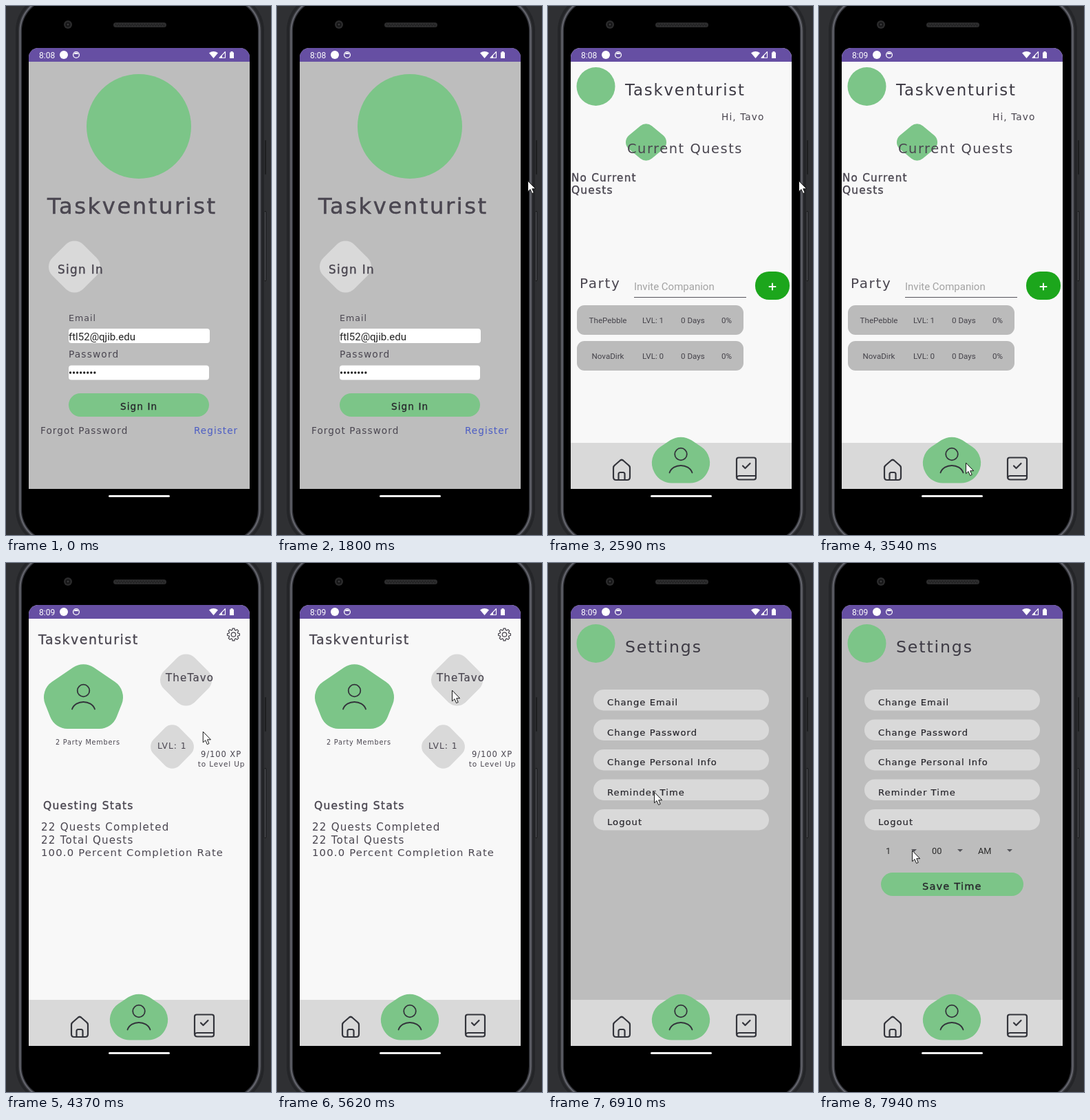
An HTML page with a canvas for the animation above (8000 ms loop, 385 px wide and 769 px high).

```html
<!DOCTYPE html>
<html lang="en">
<head>
<meta charset="utf-8">
<title>Quest app walkthrough</title>
<style>
html, body { margin: 0; width: 100%; height: 100%; overflow: hidden; background: #2f3033; }
canvas { display: block; width: 385px; height: 769px; }
</style>
</head>
<body>
<canvas id="stage" width="385" height="769"></canvas>
<script>
const LOOP = 8000, W = 385, H = 769;
const GREEN = '#7cc588', PALE = '#d9d9d9', GRAY = '#bdbdbd', LIGHT = '#f8f8f8';
const INK = '#4a4650', DARK = '#26252b', ICON = '#33343b';
const WIDE = '"DejaVu Sans", sans-serif', BODY = 'Roboto, sans-serif';
const TRACKING = 0.08;
const APP = 'Taskventurist';

const stage = document.getElementById('stage').getContext('2d');
let c = stage;

const clamp = v => Math.max(0, Math.min(1, v));
const span = (t, a, b) => clamp((t - a) / (b - a));
const smooth = u => u * u * (3 - 2 * u);

function box(x, y, w, h, r, fill) {
  c.beginPath();
  c.roundRect(x, y, w, h, r);
  c.fillStyle = fill;
  c.fill();
}

function disc(x, y, r, fill) {
  c.beginPath();
  c.arc(x, y, r, 0, 7);
  c.fillStyle = fill;
  c.fill();
}

function line(d, width, color) {
  c.lineWidth = width;
  c.strokeStyle = color;
  c.lineCap = c.lineJoin = 'round';
  c.stroke(new Path2D(d));
}

function shape(d, fill) {
  c.fillStyle = fill;
  c.fill(new Path2D(d));
}

// Polygon with rounded corners
function blob(pts, r, fill) {
  const n = pts.length, [ax, ay] = pts[0], [bx, by] = pts[n - 1];
  c.beginPath();
  c.moveTo((ax + bx) / 2, (ay + by) / 2);
  pts.forEach(([x, y], i) => c.arcTo(x, y, ...pts[(i + 1) % n], r));
  c.closePath();
  c.fillStyle = fill;
  c.fill();
}

const diamond = (x, y, a, b, r, fill) =>
  blob([[x, y - b], [x + a, y], [x, y + b], [x - a, y]], r, fill);

function text(str, x, y, size, { color = INK, font = WIDE, align = 'left', bold = 0 } = {}) {
  c.font = `${size}px ${font}`;
  c.letterSpacing = (font === WIDE ? size * TRACKING : 0) + 'px';
  c.textAlign = align;
  c.fillStyle = color;
  c.fillText(str, x, y);
  if (bold) {
    c.lineWidth = bold;
    c.strokeStyle = color;
    c.strokeText(str, x, y);
  }
}

function person(dx, dy) {
  c.save();
  c.translate(dx, dy);
  c.beginPath();
  c.arc(193, 651.5, 8.8, 0, 7);
  c.lineWidth = 1.8;
  c.strokeStyle = ICON;
  c.stroke();
  line('M176.5 678.5C181 664.5 205 664.5 209.5 678.5', 1.8, ICON);
  c.restore();
}

function navBar() {
  c.fillStyle = PALE;
  c.fillRect(-60, 635, 520, 67);
  blob([[193, 621], [244, 655], [223, 693.5], [163, 693.5], [142, 655]], 28, GREEN);
  person(0, 0);
  line('M95 671.5Q95 669 97 667.5L105 660.5Q107 659 109 660.5L117 667.5Q119 669 119 671.5V685Q119 689 115 689H99Q95 689 95 685Z' +
    'M102.5 689V680.5Q102.5 678 105 678H109Q111.5 678 111.5 680.5V689', 2.2, ICON);
  line('M277 656.5H299Q302 656.5 302 659.5V685.5Q302 688.5 299 688.5H278Q274 688.5 274 684.5V659.5Q274 656.5 277 656.5Z' +
    'M274.5 685Q275 683 278 683H302M283 668.5L286.5 672L293.5 665', 2.2, ICON);
}

function page(bg) {
  c.fillStyle = bg;
  c.fillRect(-60, 61, 520, 641);
}

function header(title, size) {
  disc(69.5, 117, 28, GREEN);
  text(title, 112, 130, size, { color: '#3d3a44' });
}

function login(t) {
  page(GRAY);
  disc(193, 175, 76, GREEN);
  text(APP, 60, 302, 32.2, { bold: 0.5 });
  diamond(99.5, 379, 45, 45, 18, PALE);
  text('Sign In', 75, 388.5, 16.8, { bold: 0.4 });
  text('Email', 91, 457.5, 12.6);
  box(91, 469, 205, 21, 4, '#fff');
  text('ftl52@qjib.edu', 91, 485.5, 15, { font: BODY, color: '#222' });
  text('Password', 91, 511, 13.8);
  box(91, 522.5, 204, 21, 4, '#fff');
  for (let i = 0; i < 8; i++) disc(93.5 + i * 5.05, 533, 1.7, '#222');
  const phase = t % 1000;
  if (phase >= 300 && phase < 800) {
    c.fillStyle = '#333';
    c.fillRect(131, 523, 1, 19);
  }
  box(91, 563, 204, 34, 17, GREEN);
  const press = span(t, 960, 1500);
  if (press > 0 && press < 1) {
    c.save();
    c.clip();
    disc(212, 586, 25 + 140 * Math.min(1, press * 2), `rgba(0,0,0,${0.1 * (1 - press)})`);
    c.restore();
  }
  text('Sign In', 166, 587, 13.6, { color: DARK, bold: 0.3 });
  text('Forgot Password', 50, 622, 13.6);
  text('Register', 273, 622, 13.5, { color: '#4b5cc4' });
}

function member(y, name, level) {
  const style = { font: BODY, color: '#45434a' };
  box(42, y, 242, 43, 11, '#bbb');
  text(name, 87, y + 25.5, 11.6, { ...style, align: 'center' });
  text('LVL: ' + level, 137, y + 26, 11.6, style);
  text('0 Days', 193, y + 25.5, 11.6, style);
  text('0%', 252, y + 26, 11.6, style);
}

function home() {
  page(LIGHT);
  header(APP, 22.8);
  text('Hi, Tavo', 252, 166, 13.7);
  diamond(142.5, 198, 37, 30.5, 13, GREEN);
  text('Current Quests', 115, 213.5, 19.4);
  text('No Current', 34, 254.5, 15.2, { bold: 0.4 });
  text('Quests', 34, 273, 15.4, { bold: 0.4 });
  text('Party', 46, 410, 20);
  text('Invite Companion', 125, 413, 15, { font: BODY, color: '#a3a3a3' });
  c.fillStyle = '#55535a';
  c.fillRect(125, 423, 163, 1);
  box(301, 386, 50, 41, 20, '#1ca61c');
  line('M321.5 408H330.5M326 403.5V412.5', 2, '#fff');
  member(435, 'ThePebble', 1);
  member(487, 'NovaDirk', 0);
  navBar();
}

function gear(x, y) {
  c.beginPath();
  for (let i = 0; i < 8; i++) {
    const a = i * Math.PI / 4;
    [[-0.27, 6.8], [-0.17, 9], [0.17, 9], [0.27, 6.8]].forEach(([d, r]) =>
      c.lineTo(x + r * Math.cos(a + d), y + r * Math.sin(a + d)));
  }
  c.closePath();
  c.moveTo(x + 3.2, y);
  c.arc(x, y, 3.2, 0, 7);
  c.lineWidth = 1.2;
  c.strokeStyle = '#44424a';
  c.lineJoin = 'round';
  c.stroke();
}

function profile() {
  page(LIGHT);
  text(APP, 47, 118, 19, { bold: 0.3 });
  gear(330.5, 104);
  blob([[112.5, 141.5], [176, 185], [154, 241], [71, 241], [49, 185]], 27, GREEN);
  person(-80.5, -466);
  text('2 Party Members', 72, 264, 9.7);
  diamond(261.5, 170, 45, 45, 18, PALE);
  text('TheTavo', 232, 172, 15, { bold: 0.2 });
  diamond(241.5, 267, 37.5, 38, 15, PALE);
  text('LVL: 1', 220, 270, 12.3);
  text('9/100 XP', 312.5, 282, 11.5, { align: 'center' });
  text('to Level Up', 313, 296, 10.5, { align: 'center' });
  text('Questing Stats', 54, 358, 15.5, { bold: 0.4 });
  text('22 Quests Completed', 51, 388.5, 15.1);
  text('22 Total Quests', 51, 407.5, 15.1);
  text('100.0 Percent Completion Rate', 51, 426, 14.8);
  navBar();
}

function settings(t) {
  page(GRAY);
  header('Settings', 23.6);
  ['Email', 'Password', 'Personal Info'].map(s => 'Change ' + s)
    .concat('Reminder Time', 'Logout')
    .forEach((label, i) => {
      const y = 184 + i * 43.5;
      box(66, y, 255, 30.5, 15, PALE);
      text(label, 86, y + 23, 13.1, { color: DARK, bold: 0.2 });
    });
  if (t >= 7130) {
    [['1', 97, 138], ['00', 164, 205], ['AM', 231, 277]].forEach(([label, x, mark]) => {
      text(label, x, 423, 12.8, { font: BODY, color: '#2b2b2b' });
      shape(`M${mark - 4} 416h8l-4 4z`, '#55555a');
    });
    box(90, 450, 207, 34, 17, GREEN);
    text('Save Time', 150, 474.5, 14.6, { color: DARK, bold: 0.3 });
  }
  navBar();
}

function statusBar(t) {
  c.fillStyle = '#664fa3';
  c.fillRect(33, 61, 321, 20);
  text(t < 3000 ? '8:08' : '8:09', 48, 75.5, 12, { font: BODY, color: '#fff' });
  disc(84, 71, 6, '#fff');
  c.beginPath();
  c.arc(102, 71, 4.4, 0, 7);
  c.lineWidth = 1.3;
  c.strokeStyle = '#fff';
  c.stroke();
  shape('M98.5 70a3.8 3.8 0 0 1 7 0z', '#fff');
  shape('M295 68.3Q301.5 63.5 308 68.3L301.5 76Z', '#fff');
  line('M310 75.3H318.5V66.5Z', 1.1, '#fff');
  shape('M310 75.5H314V71.5Z', '#fff');
  shape('M325 67.5H326.5V66H329.5V67.5H331V76H325Z', '#fff');
}

// One nested outline of the phone body, inset from the outermost edge
const shell = (inset, fill) =>
  box(14 + inset, -18 + inset, 361 - 2 * inset, 804 - 2 * inset, 54 - inset, fill);

function phone() {
  c.fillStyle = '#2f3033';
  c.fillRect(0, 0, W, H);
  shell(0, '#242528');
  box(376, 195, 2, 50, 1, '#1d1e20');
  box(375.5, 298, 2.5, 102, 1, '#18191b');
  box(376, 299, 1, 100, 0.5, '#5c5d62');
  shell(4, '#3a3b3f');
  shell(5.5, '#65666e');
  shell(7.5, '#33343a');
  shell(9, '#000');
  disc(90, 27, 6, '#2b2b2c');
  disc(90, 27, 3.6, '#161617');
  disc(90, 27, 1.4, '#3a3a3c');
  box(156, 24, 77, 7, 3.5, '#2c2c2d');
  for (let i = 0; i < 36; i++) {
    c.fillStyle = '#1b1b1c';
    c.fillRect(159 + i * 2, 25.5 + (i % 2) * 2, 1, 2);
  }
  box(149, 711, 89, 3, 1.5, '#f4f4f4');
}

// time, x, y of the pointer tip
const PATH = [
  [70, 330, 698], [850, 215, 588], [1150, 212, 586], [1660, 364, 254], [2620, 364, 254],
  [3150, 214, 673], [3340, 213, 664], [3620, 213, 664], [4190, 281, 266], [4970, 316, 113],
  [5130, 327, 103], [5330, 327, 103], [5620, 254, 185], [5830, 206, 237], [6200, 142, 325],
  [6440, 154, 333], [7250, 154, 333], [7660, 124, 402], [7800, 141, 421], [7920, 135, 418]
];

function pointer(t) {
  if (t < PATH[0][0]) return;
  let i = PATH.length - 1;
  while (PATH[i][0] > t) i--;
  const a = PATH[i], b = PATH[i + 1] || a;
  const u = a === b ? 0 : smooth(span(t, a[0], b[0]));
  c.save();
  c.translate(a[1] + (b[1] - a[1]) * u, a[2] + (b[2] - a[2]) * u);
  const arrow = 'M0.5 0.5V15.8L4 12.6L6.6 18.6L9.2 17.4L6.7 11.7H11.3Z';
  shape(arrow, '#fff');
  line(arrow, 1, '#1a1a1a');
  c.restore();
}

const layer = document.createElement('canvas');
layer.width = W;
layer.height = H;

function drawLayer() {
  c = layer.getContext('2d');
  home();
  c = stage;
}

// The new page slides and fades in while the old one drifts left
function enterHome(t) {
  const p = 1 - Math.pow(1 - span(t, 2090, 2520), 2.2);
  c.save();
  c.translate(-32 * p, 0);
  login(t);
  c.restore();
  c.globalAlpha = p;
  c.drawImage(layer, 32 * (1 - p), 0);
  c.globalAlpha = 1;
}

function draw(t) {
  phone();
  c.save();
  c.beginPath();
  c.roundRect(33, 61, 321, 641, [14, 14, 0, 0]);
  c.clip();
  if (t < 2090) login(t);
  else if (t < 2520) enterHome(t);
  else if (t < 3720) home();
  else if (t < 5690) profile();
  else settings(t);
  statusBar(t);
  c.restore();
  pointer(t);
}

drawLayer();
const start = performance.now();
function tick() {
  draw((performance.now() - start) % LOOP);
  requestAnimationFrame(tick);
}
tick();
</script>
</body>
</html>
```
